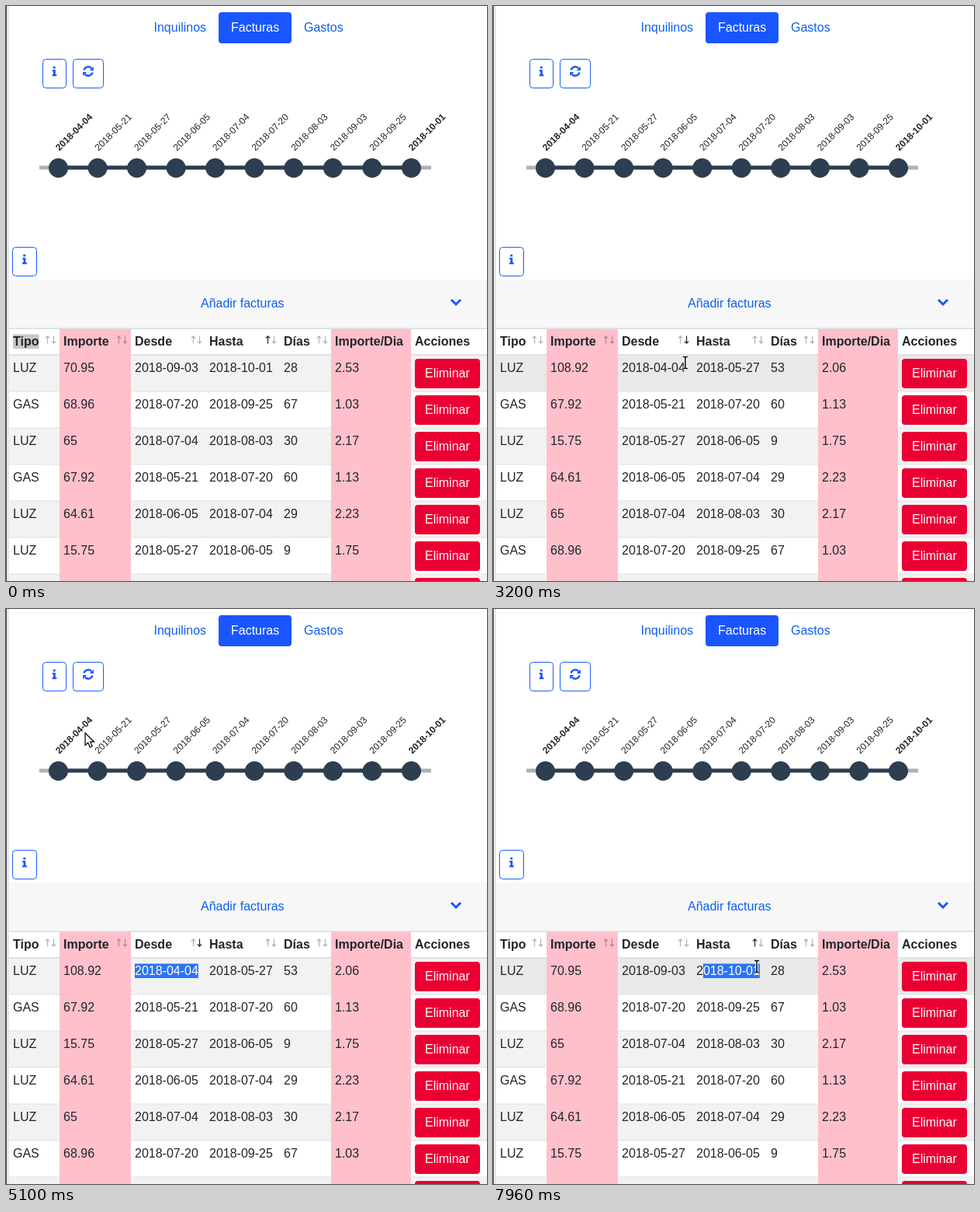
Recreate the animation shown at these times as an HTML page. Size 620 px wide and 740 px high, loop 8000 ms.

```html
<!DOCTYPE html>
<html lang="es">
<head>
<meta charset="utf-8">
<title>Facturas</title>
<style>
html, body { margin: 0; width: 100%; height: 100%; overflow: hidden; background: #fff; }
svg { display: block; width: 100vw; height: 100vh; }
text { font: 16px "Liberation Sans", Arial, sans-serif; fill: #212529; white-space: pre; }
.b { font-weight: bold; }
.link { fill: #0b5ff2; }
.light { fill: #fff; }
.day { font-size: 12px; }
.arrow { fill: none; stroke: #212529; stroke-width: 1.2; }
.box { fill: none; stroke: #1a5cf5; }
.icon { fill: #1a56ff; }
.line { fill: none; stroke: #1a56ff; }
</style>
</head>
<body>
<svg id="stage" viewBox="0 0 620 740"></svg>
<script>
const LOOP = 8000, HEAD = 437, TOP = 449, STEP = 47;
const stage = document.getElementById("stage");

// Tipo, importe, desde, hasta, días, importe por día
const bills = [
  ["LUZ", "108.92", "04-04", "05-27", "53", "2.06"],
  ["GAS", "67.92", "05-21", "07-20", "60", "1.13"],
  ["LUZ", "15.75", "05-27", "06-05", "9", "1.75"],
  ["LUZ", "64.61", "06-05", "07-04", "29", "2.23"],
  ["LUZ", "65", "07-04", "08-03", "30", "2.17"],
  ["GAS", "68.96", "07-20", "09-25", "67", "1.03"],
  ["LUZ", "70.95", "09-03", "10-01", "28", "2.53"]
].map(b => b.map((v, i) => i === 2 || i === 3 ? "2018-" + v : v));

// Title, text x, right edge
const cols = [
  ["Tipo", 9, 69], ["Importe", 74, 161], ["Desde", 166, 257], ["Hasta", 262, 353],
  ["Días", 358, 419], ["Importe/Dia", 424, 522], ["Acciones", 527, 620]
];
const SORTABLE = 5, DESDE = 2, HASTA = 3;

// Pointer keys: time, x, y
const path = [
  [970, 574, 306], [1200, 400, 380], [1470, 194, 428], [1560, 197, 430],
  [2340, 197, 430], [2560, 205, 560], [2760, 212, 684], [2900, 225, 600],
  [3120, 248, 459], [3200, 248, 459], [3840, 166, 461], [4080, 166, 461],
  [4350, 92, 225], [4600, 95, 182], [4860, 100, 158], [5100, 100, 159],
  [5400, 567, 149], [5680, 335, 472], [5900, 290, 431], [6500, 290, 431],
  [6630, 300.5, 474], [7030, 269, 466], [7290, 269, 466], [7760, 334, 460],
  [7920, 334, 460], [7960, 340, 460]
];

// Sort changes: start, column, descending
const sorts = [
  [0, HASTA, true], [1750, DESDE, true], [1920, DESDE, false],
  [5980, HASTA, true], [6150, HASTA, false], [6330, HASTA, true]
];

const rect = (x, y, w, h, fill, more = "") =>
  `<rect x="${x}" y="${y}" width="${w}" height="${h}" fill="${fill}" ${more}/>`;
const text = (s, x, y, cls = "", more = "") =>
  `<text x="${x}" y="${y}" class="${cls}" ${more}>${s}</text>`;
const group = (x, y, body) => `<g transform="translate(${x} ${y})">${body}</g>`;
const frame = (x, y, w) => `<rect class="box" x="${x + .5}" y="${y + .5}" width="${w - 1}" height="37" rx="4"/>`;
const times = (n, f) => Array.from({ length: n }, (_, i) => f(i)).join("");

const info = (x, y) => group(x, y,
  `<path class="icon" d="M-1.7-6.3h2.9v2.9h-2.9zM-2.8-2h4.1v6h1.5v2.3h-5.7v-2.3h1.4v-3.700h-1.3z"/>`);

function refresh(x, y) {
  const half = `<path class="line" stroke-width="2.3" d="M5.5 1.5A5.7 5.7 0 0 1-4.2 3.9"/>
    <path class="icon" d="M-6.9 6.200V1.1h5.1z"/>`;
  return group(x, y, half + `<g transform="rotate(180)">${half}</g>`);
}

function header() {
  return text("Inquilinos", 190.5, 33, "link") + rect(274, 8, 94, 40, "#1a56ff", 'rx="4"') +
    text("Facturas", 290, 33, "light") + text("Gastos", 384, 33, "link") +
    frame(47, 68, 31) + info(62.5, 84) + frame(86, 68, 40) + refresh(106, 84) +
    frame(8, 310, 32) + info(24, 326);
}

function timeline() {
  const days = [...new Set(bills.flatMap(b => [b[2], b[3]]))].sort();
  return rect(43, 205.5, 505, 5, "#b0b2b6") + rect(67, 205.5, 456, 5, "#2c3e50") +
    days.map((d, i) => {
      const x = 67.5 + i * 50.56;
      return `<circle cx="${x}" cy="208.500" r="12.5" fill="#2c3e50"/>` +
        text(d, 0, 0, i % 9 ? "day" : "day b", `transform="translate(${x + 1.3} 187) rotate(-45)"`);
    }).join("");
}

function titles() {
  return cols.map(([name, x, right], i) => text(name, x, HEAD, "b") + (i < SORTABLE
    ? group(right - 15.5, 429.5, `<path class="arrow" id="up${i}" d="M0 5V-4.500M-2.5-2L0-4.700L2.5-2"/>`) +
      group(right - 7.5, 429.5, `<path class="arrow" id="down${i}" d="M0-5V4.500M-2.5 2L0 4.700L2.5 2"/>`)
    : "")).join("");
}

const hand = `<path d="M-1.500 1.200Q0-.6 1.500 1.200V5.500H3.200L4 6H6L6.700 6.500H8.200L9.500 7.700V11.500L8 13.500V15.500H-1.500V13.500L-5 9.800L-5.300 8.200L-4 7.300L-1.500 9Z"
  fill="#fff" stroke="#000" stroke-width="1.300" stroke-linejoin="round"/>
  <path d="M1.500 5.500V8M4 6V8.200M6.700 6.500V8.500" stroke="#000"/>`;
const pointer = `<path d="M.5.5V16.500L4.200 13L6.700 19L9.600 17.800L7.100 12H12Z" fill="#fff" stroke="#000" stroke-width="1.200"/>`;
const beamLine = "M-3-7.500H-1L0-6.500L1-7.500H3M0-6.500V6.500M-3 7.500H-1L0 6.500L1 7.500H3";
const beam = `<path d="${beamLine}" fill="none" stroke="#fff" stroke-width="3.600"/>
  <path d="${beamLine}" fill="none" stroke="#000" stroke-width="1.500"/>`;

stage.innerHTML =
  rect(0, 0, 620, 740, "#fff") + header() + timeline() +
  rect(4, 352, 616, 62, "#f7f7f7") + text("Añadir facturas", 251, 388, "link") +
  `<path class="line" stroke-width="3" d="M574 378l6 6l6-6"/>` +
  times(4, i => rect(4, TOP + i * 2 * STEP, 616, STEP, "#f2f2f2")) +
  rect(4, 0, 616, STEP, "#e9e9e9", 'id="hover"') +
  rect(4, 414, 616, 2, "#dee2e6") + rect(4, 448, 616, 2, "#dee2e6") +
  times(6, i => rect(4, TOP + (i + 1) * STEP - 1 + .5, 616, 1, "#dee2e6")) +
  rect(69, 416, 92, 324, "#ffc0cb") + rect(419, 416, 103, 324, "#ffc0cb") +
  titles() +
  times(7, r => {
    const y = TOP + r * STEP;
    return times(6, c => text("", cols[c][1], y + 22, "cell")) +
      rect(527, y + 5, 84, 38, "#eb0033", 'rx="4"') + text("Eliminar", 540, y + 29, "light");
  }) +
  rect(0, 0, 0, 18.5, "", 'id="mark"') + text("", 0, 0, "", 'id="marked"') +
  rect(0, 415.5, 96, 33, "none", 'id="focus" stroke="#6f8fd0"') +
  rect(0, 0, 1, 740, "#4b4b4b") + rect(1, 0, 3, 740, "#e8e8e8") +
  `<g id="cursor"><g id="hand">${hand}</g><g id="pointer">${pointer}</g><g id="beam">${beam}</g></g>`;

const $ = id => document.getElementById(id);
const cells = [...stage.querySelectorAll(".cell")];
const set = (el, attrs) => { for (const k in attrs) el.setAttribute(k, attrs[k]); };
const show = (el, on) => el.setAttribute("visibility", on ? "visible" : "hidden");

function position(t) {
  const i = path.findIndex(k => k[0] > t);
  if (i < 0) return path[path.length - 1].slice(1);
  const [t0, x0, y0] = path[i - 1], [t1, x1, y1] = path[i];
  const p = (t - t0) / (t1 - t0);
  return [x0 + (x1 - x0) * p, y0 + (y1 - y0) * p];
}

function shapeAt(x, y) {
  if (y >= 352 && y < 415) return "hand";
  if (y >= 415 && y < TOP) return x < 419 ? "hand" : "pointer";
  const inRow = (y - TOP) % STEP;
  const overDate = [DESDE, HASTA].some(c => x >= cols[c][1] - 1 && x < cols[c][1] + 82);
  return y > TOP && inRow > 7 && inRow < 27 && overDate ? "beam" : "pointer";
}

const charEdge = n => n * 8.9 - (n > 4 ? 3.57 : 0) - (n > 7 ? 3.57 : 0);

// Index of the gap between characters closest to x
function charAt(x) {
  let best = 0;
  for (let n = 1; n <= 10; n++) if (Math.abs(charEdge(n) - x) < Math.abs(charEdge(best) - x)) best = n;
  return best;
}

function selection(t, x) {
  const title = c => ({ s: cols[c][0], x: cols[c][1], y: HEAD, bold: true });
  const date = (c, s, a, b) => ({ s: s.slice(a, b), x: cols[c][1] + charEdge(a), y: TOP + 22 });
  if (t < 1700) return { ...title(0), grey: true };
  if (t >= 1870 && t < 3120) return title(DESDE);
  if (t >= 3200 && t < 5930) return date(DESDE, "2018-04-04", t < 3840 ? charAt(x - 166) : 0, 10);
  if (t >= 6100 && t < 7290) return title(HASTA);
  if (t >= 7290) return date(HASTA, "2018-10-01", 1, charAt(x - 262));
  return { s: "", x: 0, y: 0 };
}

function drawTable(t) {
  const [, col, desc] = sorts.filter(s => s[0] <= t).pop();
  const rows = [...bills].sort((a, b) => (a[col] < b[col] ? -1 : 1) * (desc ? -1 : 1));
  cells.forEach((el, i) => {
    const s = rows[Math.floor(i / 6)][i % 6];
    if (el.textContent !== s) el.textContent = s;
  });
  for (let c = 0; c < SORTABLE; c++) {
    set($("up" + c), { opacity: c === col && desc ? 1 : .35 });
    set($("down" + c), { opacity: c === col && !desc ? 1 : .35 });
  }
}

function drawSelection(t, x) {
  const sel = selection(t, x), label = $("marked");
  label.textContent = sel.s;
  set(label, { x: sel.x, y: sel.y, class: (sel.bold ? "b" : "") + (sel.grey ? "" : " light") });
  set($("mark"), {
    x: sel.x, y: sel.y - 14.5, fill: sel.grey ? "#c8c8c8" : "#2b74f4",
    width: sel.s ? label.getComputedTextLength() : 0
  });
  const onDesde = t >= 1700 && t < 3120, onHasta = t >= 5930 && t < 7290;
  show($("focus"), onDesde || onHasta);
  set($("focus"), { x: onDesde ? 161.5 : 257.5 });
}

function drawCursor(t, x, y) {
  const on = t >= path[0][0], kind = shapeAt(x, y);
  for (const id of ["hand", "pointer", "beam"]) show($(id), on && id === kind);
  set($("cursor"), { transform: `translate(${x} ${y})` });
  show($("hover"), on && y > TOP);
  set($("hover"), { y: TOP + Math.max(0, Math.floor((y - TOP) / STEP)) * STEP });
}

function draw(t) {
  const [x, y] = t < path[0][0] ? [0, 0] : position(t);
  drawTable(t);
  drawSelection(t, x);
  drawCursor(t, x, y);
}

const start = performance.now();
function tick() {
  draw((performance.now() - start) % LOOP);
  requestAnimationFrame(tick);
}
tick();
</script>
</body>
</html>
```
